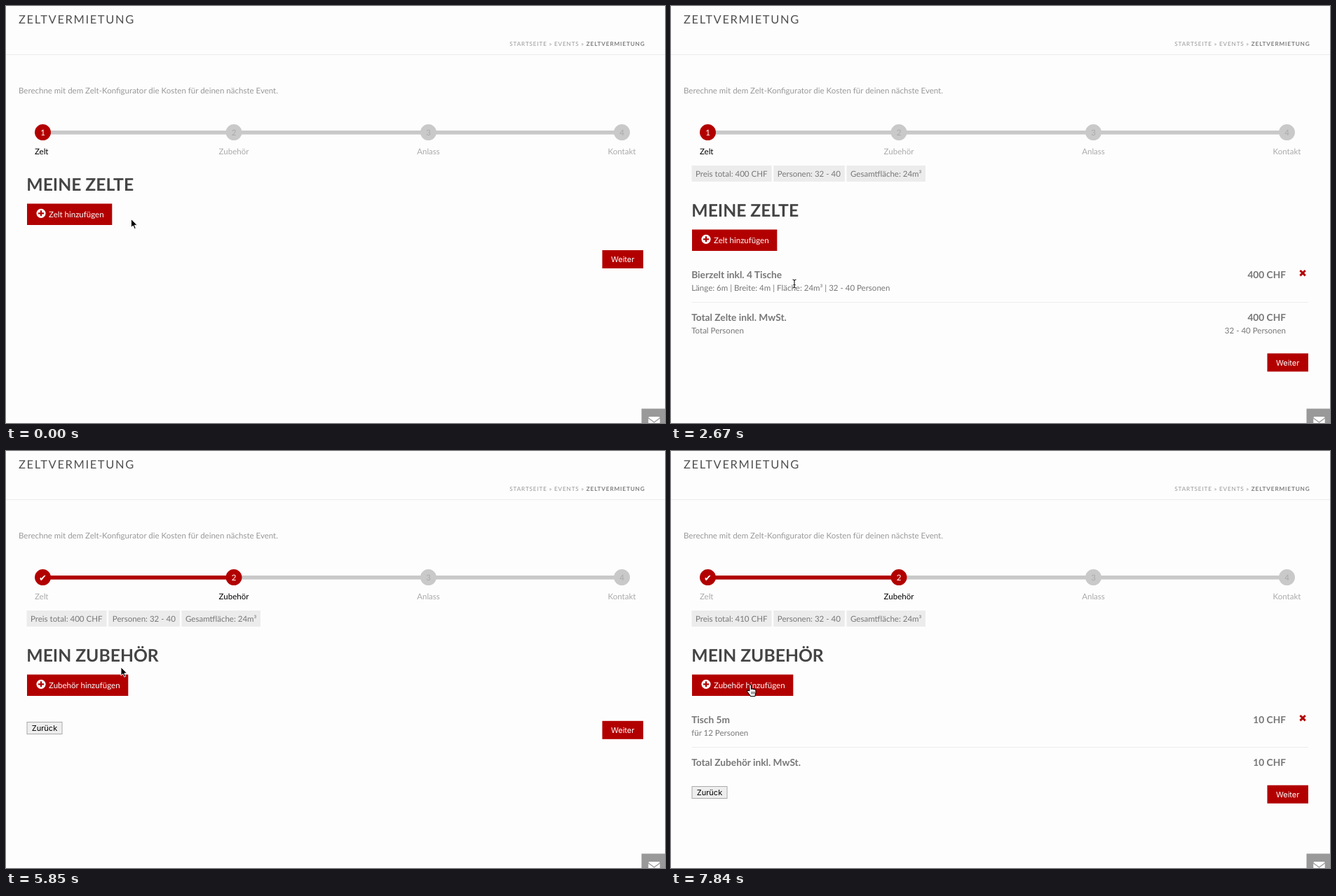
Animation of 940x596 px, one loop 7990 ms. Source, as an HTML page:

```html
<!DOCTYPE html>
<html lang="de">
<head>
<meta charset="utf-8">
<title>Zeltvermietung</title>
<style>
  html, body { margin: 0; height: 100%; overflow: hidden; background: #fdfdfd; }
  svg { display: block; width: 940px; height: 596px; }
  text { font: 11.53px Lato, sans-serif; fill: #777; white-space: pre; text-rendering: geometricPrecision; }
  .title { font-size: 16.47px; letter-spacing: 1.65px; fill: #505050; }
  .crumbs { font-size: 8.24px; letter-spacing: .82px; fill: #999; }
  .crumbs tspan { font-weight: 700; fill: #808080; }
  .intro { fill: #999; }
  .off { fill: #aaa; }
  .on { fill: #000; }
  .white { fill: #fff; }
  .check { font: 13px "DejaVu Sans", sans-serif; fill: #fff; }
  .head { font-size: 24.7px; font-weight: 700; fill: #444; }
  .bold { font-size: 13.72px; font-weight: 700; }
  .ui { font: 11px Inter, sans-serif; fill: #000; }
  .ui.white { fill: #fff; }
</style>
</head>
<body>
<svg id="stage" viewBox="0 0 940 596"></svg>
<script>
const LOOP = 7990, RED = '#b20000', GREY = '#c9c9c9';
const stage = document.getElementById('stage');

const text = (x, y, str, cls = '', anchor = 'start') =>
  `<text x="${x}" y="${y}" class="${cls}" text-anchor="${anchor}">${str}</text>`;
const rect = (x, y, w, h, fill, more = '') =>
  `<rect x="${x}" y="${y}" width="${w}" height="${h}" fill="${fill}" ${more}/>`;
const path = (d, stroke, width, fill = 'none') =>
  `<path d="${d}" stroke="${stroke}" stroke-width="${width}" fill="${fill}"/>`;

const size = (l, b, area, people) =>
  `Länge: ${l}m | Breite: ${b}m | Fläche: ${area} | ${people} Personen`;

const tentRows = [
  ['keine genaue Zeltvorstellung', size(0, 0, '0m²', '0 - 0'), 'auf Anfrage'],
  ['Bierzelt inkl. 4 Tische', size(6, 4, '24m²', '32 - 40'), '400 CHF'],
  ['Bierzelt inkl. 6 Tische', size(8, 4, '32m²', '48 - 60'), '500 CHF'],
  ['Bierzelt inkl. 8 Tische', size(10, 4, '40m²', '64 - 80'), '600 CHF'],
  ['Bierzelt inkl. 12 Tische', size(12, 4, '48m²', '96 - 120'), '750 CHF']
];
const extraRows = [
  ['keine genaue Zubehörvorstellung', '', 'auf Anfrage'],
  ['Tisch 3m', 'für 8 Personen', '6 CHF'],
  ['Tisch 5m', 'für 12 Personen', '10 CHF'],
  ['Bühneelement 2.5m x 2.5m', 'mehrere Elemente können zu einer grossen Bühne zusammengestellt werden.', '50 CHF'],
  ['Bodenplatten 1m x 1m', '', '50 CHF']
];

const weiter = y => rect(850.5, y, 58.5, 26, RED) + text(879.7, y + 17, 'Weiter', 'ui white', 'middle');
const back = y => rect(30, y, 50, 17, '#eee', 'stroke="#aaa"') + text(55, y + 12.8, 'Zurück', 'ui', 'middle');

function addButton(y, label, w) {
  return rect(30, y, w, 30.5, RED) +
    `<circle cx="50" cy="${y + 13.8}" r="6.6" fill="#fff"/>` +
    path(`M46 ${y + 13.8}h8m-4 -4v8`, RED, 2.2) +
    text(61, y + 19.3, label, 'white');
}

function chips(total) {
  return [[29.5, 114, `Preis total: ${total} CHF`], [146.3, 101.5, 'Personen: 32 - 40'],
    [250.5, 112.5, 'Gesamtfläche: 24m³']]
    .map(([x, w, s]) => rect(x, 228, w, 23, '#ececec') + text(x + 5.5, 244, s)).join('');
}

function steps(active) {
  const xs = [52.5, 325, 602.5, 878.5], labels = ['Zelt', 'Zubehör', 'Anlass', 'Kontakt'];
  let out = rect(52, 178, 826, 5.6, GREY) + rect(52, 178, xs[active] - 52, 5.6, RED);
  xs.forEach((x, i) => {
    out += `<circle cx="${x}" cy="180.6" r="11.5" fill="${i <= active ? RED : GREY}"/>` +
      (i < active ? text(x, 185.6, '✔', 'check', 'middle')
        : text(x, 185.2, i + 1, i > active ? 'off' : 'white', 'middle')) +
      text(i ? x : 50.7, 212, labels[i], i === active ? 'on' : 'off', 'middle');
  });
  return out;
}

function choice(y, head, hint, rows, pointerY) {
  let out = text(29.3, y + 264, head, 'head') + text(29.6, y + 296, hint);
  let top = y + 312;
  rows.forEach(([name, info, price], i) => {
    const end = top + (info || i ? 61.6 : 42.5), line = Math.round(end) - 1;
    if (pointerY >= top && pointerY < end) out += rect(30, Math.round(top) - 1, 880, line - Math.round(top) + 1, '#f1f1f1');
    out += rect(30, line, 880, 1, '#eee') +
      text(40.7, top + 26.4, name, 'bold') + text(40.7, top + 44.6, info) +
      text(898.2, top + 26.4, price, 'bold', 'end');
    top = end;
  });
  return out;
}

function cart(name, info, price, total, people) {
  return text(29.2, 388.5, name, 'bold') + text(29.2, 406.6, info) +
    text(877, 388.5, price, 'bold', 'end') +
    path('M897.4 378l7.4 7.4m0 -7.4l-7.4 7.4', RED, 2.9) +
    rect(29.5, 423, 879.5, 1, '#eee') +
    text(29.2, 450, total, 'bold') + text(877, 450, price, 'bold', 'end') +
    (people ? text(29.2, 468.2, 'Total Personen') + text(877, 468.2, people, '', 'end') : '');
}

const tents = y => text(29.3, y + 264, 'MEINE ZELTE', 'head') + addButton(y + 282.5, 'Zelt hinzufügen', 121.3);
const extras = () => text(29.3, 301, 'MEIN ZUBEHÖR', 'head') + addButton(319.5, 'Zubehör hinzufügen', 144.3);

const pages = {
  start: () => steps(0) + tents(0) + weiter(349),
  pickTent: y => steps(0) + choice(0, 'ZELTAUSWAHL', 'Wähle beliebige Zelte für dein Event aus.', tentRows, y),
  tentCart: () => steps(0) + chips(400) + tents(37) + weiter(496.5) +
    cart('Bierzelt inkl. 4 Tische', size(6, 4, '24m³', '32 - 40'), '400 CHF',
      'Total Zelte inkl. MwSt.', '32 - 40 Personen'),
  extraStart: () => steps(1) + chips(400) + extras() + back(387.5) + weiter(385.8),
  pickExtra: y => steps(1) + chips(400) +
    choice(37, 'ZUBEHÖRAUSWAHL', 'Wähle beliebiges Zubehör für dein Event aus.', extraRows, y),
  extraCart: () => steps(1) + chips(410) + extras() + back(479.5) + weiter(477.7) +
    cart('Tisch 5m', 'für 12 Personen', '10 CHF', 'Total Zubehör inkl. MwSt.')
};

// time, page, scrollbar shown
const scenes = [
  [0, 'start', 0], [790, 'pickTent', 1], [2070, 'tentCart', 1], [2670, 'tentCart', 0],
  [5250, 'extraStart', 0], [6470, 'pickExtra', 1], [7390, 'extraCart', 1], [7540, 'extraCart', 0]
];

// start, end, steps, then points: step, x, y, cursor on the way there
const moves = [
  [150, 950, 6, [[0, 178.5, 304.5, 'arrow'], [2, 155, 304, 'arrow'], [4, 125, 304, 'hand'], [6, 125, 304, 'hand']]],
  [1240, 1770, 4, [[0, 125, 304, 'hand'], [4, 175, 395, 'hand']]],
  [2070, 2071, 1, [[0, 175, 395, 'hand'], [1, 176, 397, 'beam']]],
  [2670, 3620, 7, [[0, 176, 397, 'beam'], [1, 176, 397, 'beam'], [7, 896, 358, 'arrow']]],
  [3770, 4800, 8, [[0, 896, 358, 'arrow'], [8, 349, 190, 'arrow']]],
  [4950, 5850, 7, [[0, 349, 190, 'arrow'], [2, 325, 183, 'hand'], [3, 325, 183, 'hand'], [7, 164, 309, 'arrow']]],
  [6000, 6940, 7, [[0, 164, 309, 'arrow'], [3, 125, 333, 'hand'], [4, 125, 333, 'hand'], [7, 150, 425, 'arrow']]],
  [7240, 7840, 5, [[0, 150, 425, 'arrow'], [1, 165, 462, 'arrow'], [2, 165, 462, 'hand'],
    [4, 124, 362, 'arrow'], [5, 113, 334, 'hand']]]
];

function pointerAt(t) {
  const [start, end, n, points] = moves.findLast(m => t >= m[0]) || moves[0];
  const step = t < start ? 0 : Math.min(n, 1 + Math.floor((t - start) / (end - start) * (n - 1) + .001));
  const i = Math.max(1, points.findIndex(p => p[0] >= step));
  const [k0, x0, y0, kind0] = points[i - 1], [k1, x1, y1, kind1] = points[i];
  const u = (step - k0) / (k1 - k0), e = u * u * (3 - 2 * u);
  return { x: x0 + (x1 - x0) * e, y: y0 + (y1 - y0) * e, kind: step ? kind1 : kind0 };
}

const beam = 'M-2.5 -6Q0 -6 0 -4.5Q0 -6 2.5 -6M0 -5V5M-2.5 6Q0 6 0 4.5Q0 6 2.5 6M-1.5 1.5H1.5';
const cursors = {
  arrow: path('M0 0V12L2.8 9.5L4.8 14L6.7 13.2L4.8 8.8H8.6Z', '#fff', .9, '#000'),
  hand: '<g transform="scale(1.08)">' +
    path('M-1 8V1.2a1.2 1.2 0 0 1 2.4 0V5.8q1.2 -1 2.2 .2q1.2 -.8 2 .4q1.5 -.4 1.8 1.2V10.5L6.3 15.3H.5' +
      'L-4 9.2q-.6 -1.5 .9 -1.7Z', '#000', 1, '#fff') +
    path('M1.8 9v3.6m1.9 -3.6v3.6m1.9 -3.6v3.6', '#000', .7) + '</g>',
  beam: path(beam, '#fff', 2.4) + path(beam, '#000', 1)
};

const header = text(18, 25.4, 'ZELTVERMIETUNG', 'title') +
  text(911.6, 56.7, 'STARTSEITE » EVENTS » <tspan>ZELTVERMIETUNG</tspan>', 'crumbs', 'end') +
  text(18, 124.8, 'Berechne mit dem Zelt-Konfigurator die Kosten für deinen nächste Event.', 'intro');

const mail = rect(906.5, 575.5, 36.5, 21, '#999') + rect(916.3, 587, 16.4, 13, '#fff', 'rx="1.5"') +
  path('M916 588.7L924.5 595L933 588.7', '#999', 1.3);

function draw(t) {
  const [, page, bar] = scenes.findLast(s => t >= s[0]);
  const p = pointerAt(t);
  return rect(0, 69, 940, 1, '#ebebeb') +
    `<g transform="translate(${bar * -6})">${header}${pages[page](p.y)}</g>` +
    (bar ? rect(939, 0, 1, 596, '#e8e8e8') + rect(892, 178, 1, 6, '#ddd') : '') +
    `<g transform="translate(${bar * -12})">${mail}</g>` +
    `<g transform="translate(${p.x.toFixed(1)} ${p.y.toFixed(1)})">${cursors[p.kind]}</g>`;
}

let shown = '';
function tick() {
  const next = draw(performance.now() % LOOP);
  if (next !== shown) stage.innerHTML = shown = next;
  requestAnimationFrame(tick);
}
tick();
</script>
</body>
</html>
```
